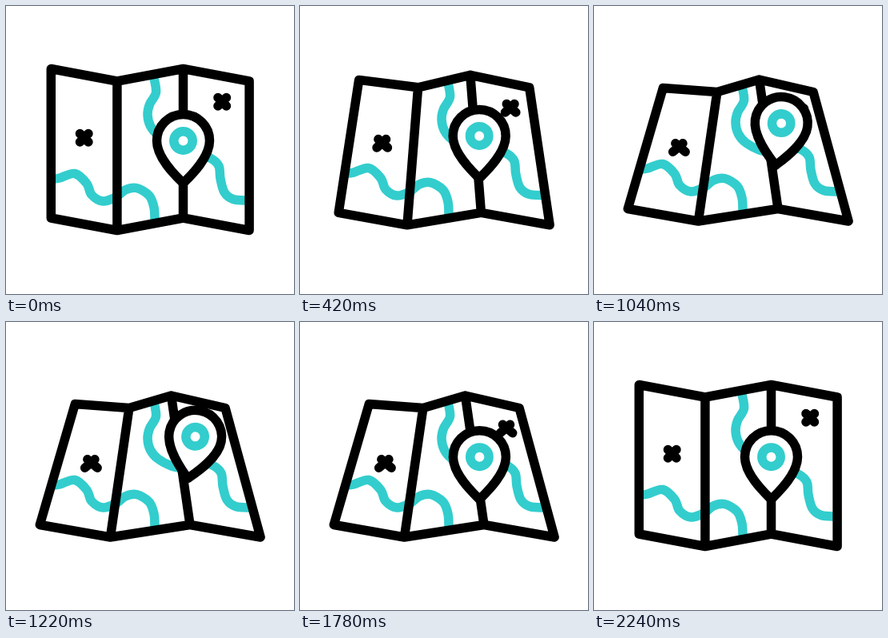
Animation, 360 px wide and 360 px high, one loop 2.4 s. Source, as an HTML page:

```html
<!DOCTYPE html>
<html>
<head>
<meta charset="utf-8">
<title>Map</title>
<style>
html, body { margin: 0; width: 100%; height: 100%; overflow: hidden; background: #fff; }
svg { display: block; width: 100vw; height: 100vh; }
path, circle { fill: none; stroke: #000; stroke-width: 11.5; stroke-linecap: round; stroke-linejoin: round; }
.teal, .teal path { stroke: #33cdcd; stroke-linecap: butt; }
#pin path { fill: #fff; }
</style>
</head>
<body>
<svg viewBox="0 0 360 360">
  <g id="roads" class="teal"></g>
  <path id="sheet"/>
  <path id="crosses"/>
  <g id="pin">
    <path d="M0 53C-8 45-33 22-33 0A33 33 0 0 1 33 0C33 22 8 45 0 53Z"/>
    <circle class="teal" r="11.7"/>
  </g>
</svg>
<script>
const LOOP = 2400;
const $ = id => document.getElementById(id);
const mix = (a, b, k) => a + (b - a) * k;
const span = (t, from, to) => Math.min(1, Math.max(0, (t - from) / (to - from)));
const ease = k => k * k * (3 - 2 * k);

// Smooth curve through a few points
function smooth(pts) {
  let d = 'M' + pts[0];
  for (let i = 1; i < pts.length; i++) {
    const a = pts[i - 1], b = pts[i];
    const before = pts[i - 2] || a, after = pts[i + 1] || b;
    const c1 = a.map((v, j) => v + (b[j] - before[j]) / 6);
    const c2 = b.map((v, j) => v - (after[j] - a[j]) / 6);
    d += `C${c1} ${c2} ${b}`;
  }
  return d;
}

// Roads keep their form and slide by `shift` as the map tilts
const roads = [
  { shift: [0, -12], pts: [[57, 216.5], [67, 215], [86, 209.5], [101, 222], [107, 236], [121, 244],
    [137, 239], [149, 230], [163, 227.5], [179, 237], [185, 252], [186, 268]] },
  { shift: [0, 10], pts: [[184.5, 88], [187.5, 108], [179.5, 123], [177, 136], [180.5, 150], [190, 161], [207, 170], [222, 173]] },
  { shift: [3, -11], pts: [[240, 186], [256, 190.5], [266, 200], [268, 216], [273, 233], [284, 241.5], [302, 243]] }
];
for (const road of roads) {
  road.path = $('roads').appendChild(document.createElementNS('http://www.w3.org/2000/svg', 'path'));
  road.path.setAttribute('d', smooth(road.pts));
}

// Zigzag sheet: the top narrows and drops, the bottom widens and rises
function sheet(tilt) {
  const top = [], bottom = [];
  for (let i = 0; i < 4; i++) {
    const side = i < 2 ? -1 : 1, outer = i % 3 ? 1 : 2;
    const x = 180.2 + 82.6 * (i - 1.5), fold = i % 2 * 15.5;
    top.push([x - side * outer * 15 * tilt, 78.5 + fold + (i ? 13.5 : 24) * tilt]);
    bottom.push([x + side * (outer * 5.5 + 3) * tilt, 265 + fold - 11.5 * tilt]);
  }
  return `M${top.join('L')}L${[...bottom].reverse().join('L')}Z` +
    [1, 2].map(i => `M${top[i]}L${bottom[i]}`).join('');
}

// Cross whose lower arms spread with the tilt
function cross(x, y, tilt) {
  const up = 5.25 - 0.7 * tilt, low = 5.25 + 2.5 * tilt;
  return [-1, 1].map(s => `M${x - s * up} ${y - 5.25}L${x + s * low} ${y + 5.25}`).join('');
}

// x, y, angle: ride the tilt, lift off, drop, slide home
function pinPose(t) {
  const ride = ease(span(t, 200, 600)), lift = ease(span(t, 700, 1200));
  const lifted = [221.5 + 4.6 * ride + 10.6 * lift, 168.5 - 10.5 * ride - 15 * lift, 10.3 * lift];
  const landed = [mix(226.8, 221.5, span(t, 1400, 2240)), 168.7, 0];
  const drop = span(t, 1200, 1400) ** 2;
  return lifted.map((v, i) => mix(v, landed[i], drop));
}

function draw(t) {
  const tilt = ease(span(t, 200, 600)) - ease(span(t, 1800, 2220));
  for (const { path, shift } of roads)
    path.setAttribute('transform', `translate(${shift.map(v => v * tilt)})`);
  $('sheet').setAttribute('d', sheet(tilt));
  $('crosses').setAttribute('d',
    cross(97.7 + 8.7 * tilt, 164.8 + 12.2 * tilt, tilt) +
    cross(270.2 - 12.2 * tilt, 119.8 + 13.7 * tilt, tilt));
  const [x, y, angle] = pinPose(t);
  $('pin').setAttribute('transform', `translate(${x} ${y}) rotate(${angle})`);
}

const start = performance.now();
function tick() {
  draw((performance.now() - start) % LOOP);
  requestAnimationFrame(tick);
}
tick();
</script>
</body>
</html>
```
